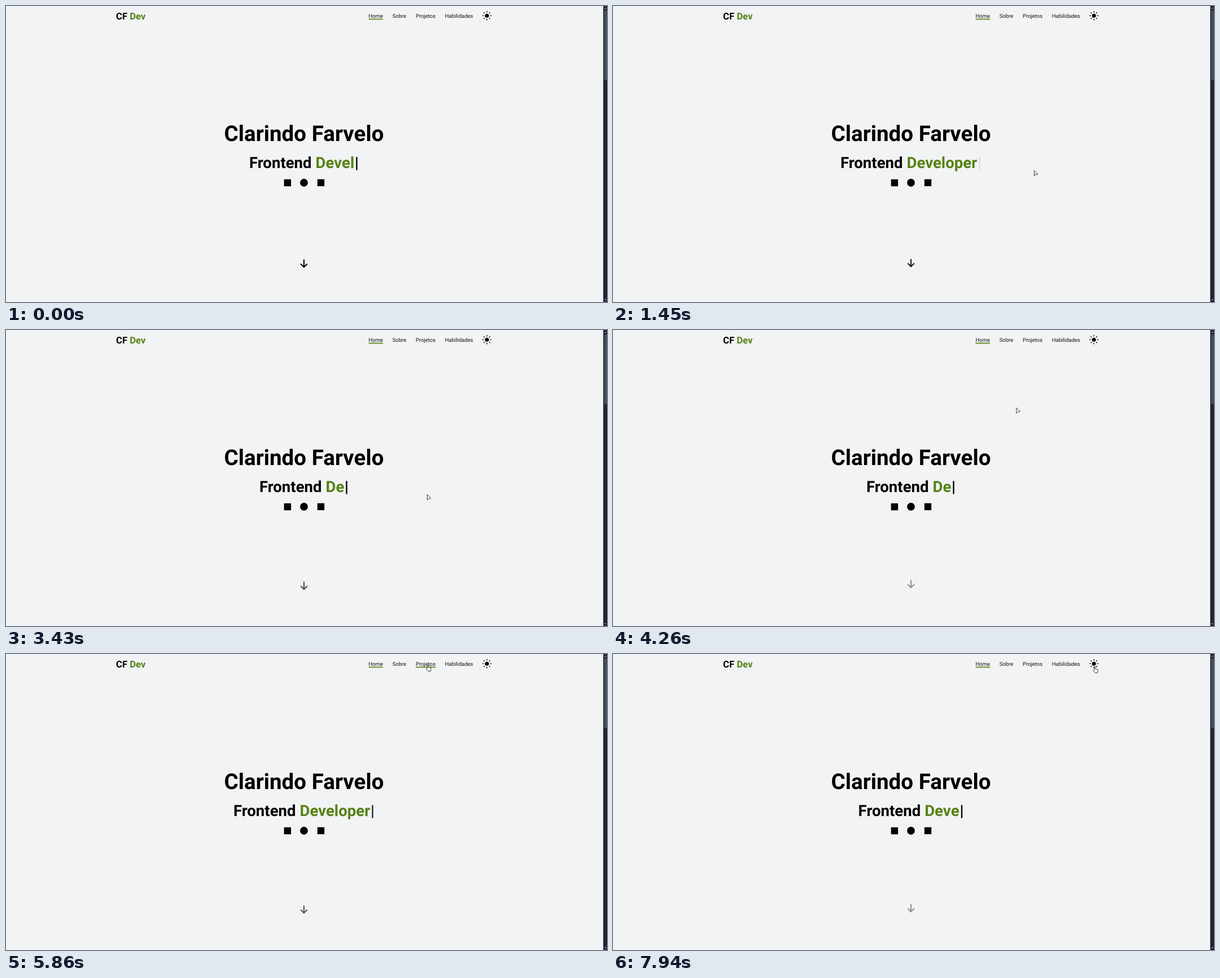
Write an HTML page that moves like this. It is 1065 by 526 pixels and loops after 8 s.

```html
<!DOCTYPE html>
<html lang="pt">
<head>
<meta charset="utf-8">
<title>Portfolio</title>
<style>
  html, body { margin: 0; width: 100%; height: 100%; overflow: hidden; background: #f2f3f5; }
  svg { display: block; }
  text { font-family: Roboto, sans-serif; white-space: pre; text-rendering: geometricPrecision; }
  .bold { font-weight: 700; }
  .green { fill: #558214; }
  .nav { font-size: 9.5px; fill: #111; }
  .line { fill: none; stroke: #000; }
  .pointer { fill: #fff; stroke: #222; stroke-width: .9; stroke-linejoin: round; }
</style>
</head>
<body>
<svg width="1065" height="526" viewBox="0 0 1065 526">
  <rect width="1065" height="526" fill="#f2f3f5"/>

  <text class="bold" x="195" y="24" font-size="16.7">CF <tspan class="green">Dev</tspan></text>
  <g id="nav"></g>
  <g id="sun" transform="translate(852.2 17.2)"><circle r="3.5"/></g>

  <text class="bold" x="528" y="240.3" font-size="38.6" text-anchor="middle">Clarindo Farvelo</text>
  <text class="bold" x="528" y="288" font-size="27.6" text-anchor="middle">Frontend <tspan id="word" class="green"></tspan><tspan id="caret" dx=".8">|</tspan></text>

  <rect x="492.7" y="308" width="12.4" height="12.4"/>
  <circle cx="528" cy="314" r="6.9"/>
  <rect x="551.8" y="307.8" width="12.4" height="12.4"/>

  <path id="arrow" class="line" stroke-width="2.1" d="M528 450.6V464M522.2 458.3L528 464.1L533.8 458.3"/>

  <rect x="1058.3" width="6.7" height="526" fill="#21242f"/>
  <rect x="1060" y="8" width="5" height="124" fill="#454c5d"/>
  <path d="M1060 5l2-2.6 2 2.6zM1060 521l2 2.6 2-2.6z" fill="#8a909c"/>

  <path id="tip" class="pointer" d="M.4 .4V10L2.8 7.7L6.8 7Z"/>
  <path id="hand" class="pointer" d="M-.9 6.6V1.2a.95 .95 0 0 1 1.9 0V4.5l3.4 .7q1.2 .3 1 1.7L4.6 11.5H.4L-2.7 7.8q-.5-1.2 .7-1.4Z"/>
</svg>
<script>
const LOOP = 8000;
const WORD = 'Developer', LETTER = 200, CYCLE = 4785, FIRST_DELETE = 1982;
const BLINK_AT = 3780, BLINK = 800;
const BOUNCE = 1228, LOWEST = 55;

const $ = id => document.getElementById(id);
const clamp = (v, lo = 0, hi = 1) => Math.min(hi, Math.max(lo, v));
const smooth = p => p * p * (3 - 2 * p);
const show = (el, on) => el.setAttribute('visibility', on ? 'visible' : 'hidden');

function add(parent, tag, attrs) {
  const el = document.createElementNS('http://www.w3.org/2000/svg', tag);
  for (const k in attrs) el.setAttribute(k, attrs[k]);
  return parent.appendChild(el);
}

let left = 642.5;
const links = ['Home', 'Sobre', 'Projetos', 'Habilidades'].map(label => {
  const x = left;
  const text = add($('nav'), 'text', { class: 'nav', x, y: 20.6 });
  text.textContent = label;
  const width = text.getComputedTextLength();
  left += width + 16.64;
  return { x, width, bar: add($('nav'), 'rect', { class: 'green', x, y: 22.6, height: 1.7, width }) };
});

for (let a = 0; a < 360; a += 45)
  add($('sun'), 'path', {
    class: 'line', 'stroke-width': 1.3, 'stroke-linecap': 'round', d: 'M0 -6.1V-7.7', transform: `rotate(${a})`
  });

// pointer moves: departure, arrival, x, y
const moves = [
  [130, 880, 746, 292],
  [3600, 4820, 690, 18],
  [5130, 5500, 744, 19],
  [5800, 6200, 803, 19],
  [6840, 6970, 805, 25],
  [7030, 7500, 854, 22]
];

function pointerAt(t) {
  let x = 988, y = 503;
  for (const [from, to, toX, toY] of moves) {
    const p = smooth(clamp((t - from) / (to - from)));
    x += (toX - x) * p;
    y += (toY - y) * p;
  }
  return [x, y];
}

// deletes the word, types it again, then rests with a blinking caret
function drawTyping(t) {
  const u = (t - FIRST_DELETE + CYCLE) % CYCLE;
  const n = Math.abs(WORD.length - Math.floor(u / LETTER));
  $('word').textContent = WORD.slice(0, n);
  const p = clamp((u - BLINK_AT) / BLINK);
  $('caret').setAttribute('fill-opacity', smooth(Math.abs(1 - 2 * p)));
}

function drawArrow(t) {
  const lift = (1 - Math.cos((t - LOWEST) / BOUNCE * 2 * Math.PI)) / 2;
  $('arrow').setAttribute('transform', `translate(0 ${-6.6 * lift})`);
  $('arrow').setAttribute('opacity', 1 - .63 * lift);
}

function drawPointer(t) {
  const [x, y] = pointerAt(t);
  let active = x > 844 && y < 26;
  links.forEach((link, i) => {
    const over = x >= link.x && x <= link.x + link.width;
    show(link.bar, i === 0 || over && y < 25.5);
    active ||= over && y < 23;
  });
  for (const id of ['tip', 'hand']) {
    $(id).setAttribute('transform', `translate(${x} ${y})`);
    show($(id), t >= moves[0][0] && active === (id === 'hand'));
  }
}

const start = performance.now();
function tick() {
  const t = (performance.now() - start) % LOOP;
  drawTyping(t);
  drawArrow(t);
  drawPointer(t);
  requestAnimationFrame(tick);
}
tick();
</script>
</body>
</html>
```
